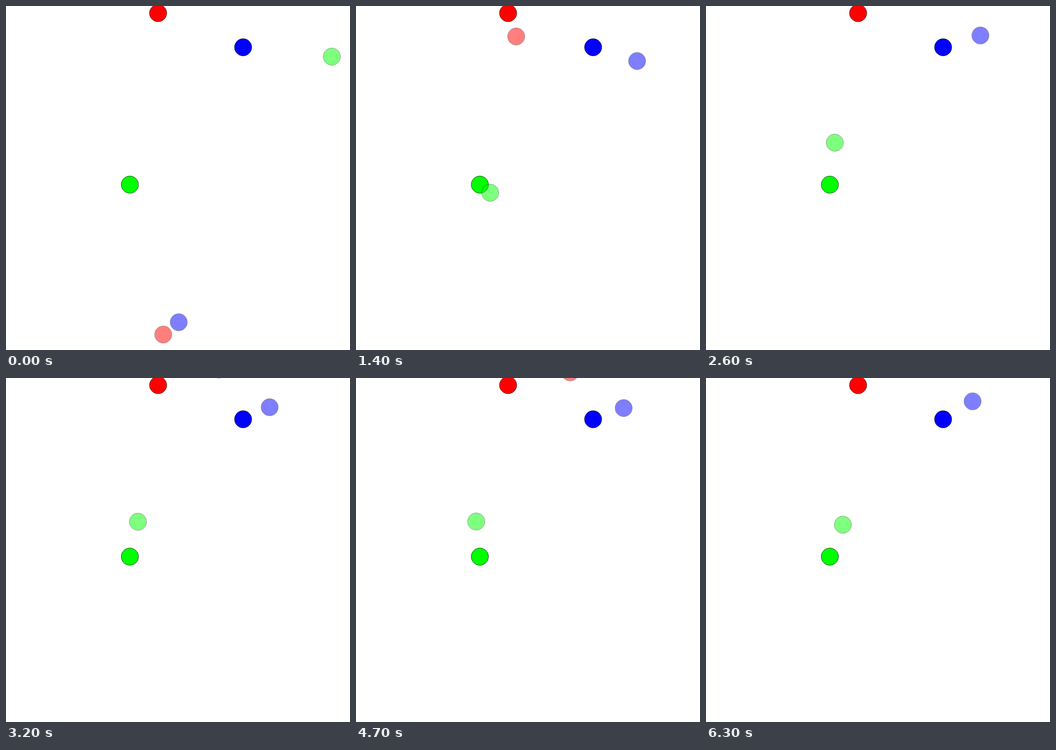
An HTML page for the animation above (6400 ms loop, 700 by 700 pixels).

```html
<!DOCTYPE html>
<html>
<head>
<meta charset="utf-8">
<style>
  html, body { margin: 0; width: 100%; height: 100%; overflow: hidden; background: #fff; }
  svg { display: block; width: 100%; height: 100%; }
  circle { stroke: #000; stroke-opacity: .75; stroke-width: 1; }
  .guess { opacity: .5; }
</style>
</head>
<body>
<svg viewBox="0 0 700 700"></svg>
<script>
const LOOP = 6400, STEP = 100;

// Steps at which every guess passes its key points.
const KEYS = [0, 8, 14, 20, 32, 41, 53, 63];

// Each guess rushes towards its anchor, then wanders near it; sway bends its way sideways.
const balls = [
  { color: '#f00', anchor: [309.5, 14.5], sway: 0, path: [
    [320, 668.5], [285, 250.5], [326, 62], [375, -25], [433, -17.2], [429.5, -16], [442, -9.5], [438, -28]] },
  { color: '#0f0', anchor: [252, 363.5], sway: -4, path: [
    [663, 103], [313, 427.5], [273, 380], [278.5, 280.5], [268.5, 292.5], [266, 296], [251.5, 289], [278.5, 298.5]] },
  { color: '#00f', anchor: [482.5, 84], sway: 4, path: [
    [351.5, 643.5], [512.5, 225.5], [572, 112], [558.5, 68], [536.5, 59.5], [533, 59.5], [534, 61], [542.5, 47.5]] }
];

const svg = document.querySelector('svg');

function addCircle(color, cls) {
  const c = document.createElementNS(svg.namespaceURI, 'circle');
  c.setAttribute('r', 17.5);
  c.setAttribute('fill', color);
  c.setAttribute('class', cls);
  svg.append(c);
  return c;
}

function place(circle, [x, y]) {
  circle.setAttribute('cx', x);
  circle.setAttribute('cy', y);
}

function slope(path, i, axis) {
  const a = Math.max(i - 1, 0), b = Math.min(i + 1, KEYS.length - 1);
  return (path[b][axis] - path[a][axis]) / (KEYS[b] - KEYS[a]);
}

// Cubic Hermite curve through the key points, plus the sideways sway.
function pointAt({ path, sway }, s) {
  let i = 0;
  while (i < KEYS.length - 2 && s >= KEYS[i + 1]) i++;
  const d = KEYS[i + 1] - KEYS[i], u = (s - KEYS[i]) / d;
  const ease = u * u * (3 - 2 * u), bend = d * u * (1 - u);
  const [x, y] = [0, 1].map(k => path[i][k] + (path[i + 1][k] - path[i][k]) * ease
    + bend * ((1 - u) * slope(path, i, k) - u * slope(path, i + 1, k)));
  return [x + bend * sway, y];
}

for (const b of balls) place(addCircle(b.color, 'anchor'), b.anchor);
for (const b of balls) b.guess = addCircle(b.color, 'guess');

function draw(t) {
  const s = Math.floor(t % LOOP / STEP);
  for (const b of balls) place(b.guess, pointAt(b, s));
}

const start = performance.now();
function tick() {
  draw(performance.now() - start);
  requestAnimationFrame(tick);
}
tick();
</script>
</body>
</html>
```
